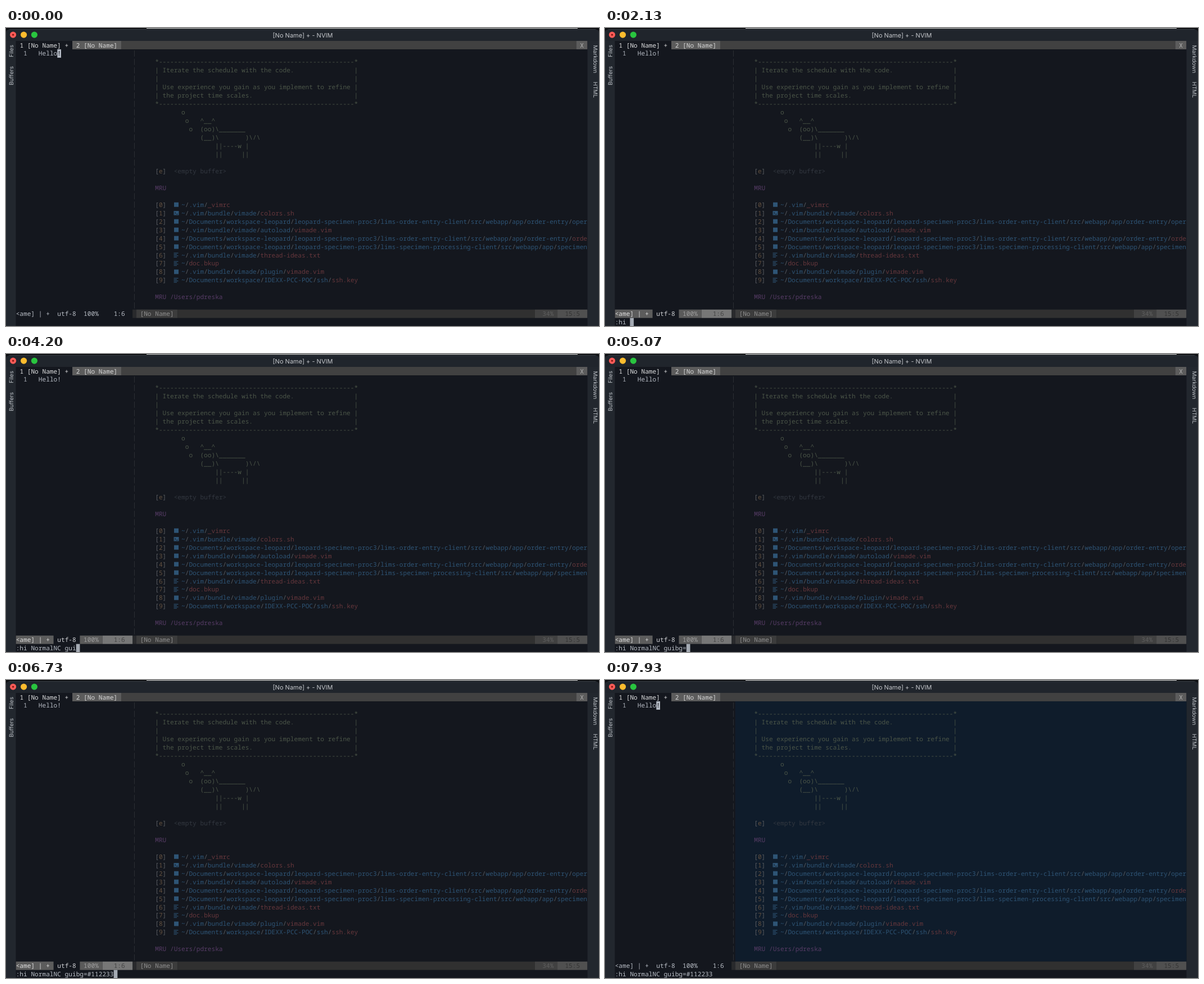
Write an HTML page that moves like this. It is 1055 px wide and 531 px high and loops after 8000 ms.

```html
<!DOCTYPE html>
<html lang="en">
<head>
<meta charset="utf-8">
<title>Editor highlight command</title>
<style>
  html, body { margin: 0; width: 100%; height: 100%; overflow: hidden; background: #0b0d10; }
  svg { display: block; width: 1055px; height: 531px; }
  text { white-space: pre; text-rendering: geometricPrecision; }
  .mono { font: 11.15px "Noto Sans Mono", "DejaVu Sans Mono", monospace; }
  .ui { font: 10px Inter, "Open Sans", sans-serif; fill: #bcc0c6; text-anchor: middle; }
  .title { font-size: 11px; fill: #c3c6ca; }
</style>
</head>
<body>
<svg id="stage" viewBox="0 0 1055 531">
  <defs><clipPath id="grid"><rect x="17" y="22" width="1017.5" height="509"/></clipPath></defs>
  <rect x="250" width="767" height="1" fill="#e4e6e6"/>
  <path d="M0 531V9Q0 2 7 2H1048Q1055 2 1055 9V531Z" fill="#20252c"/>
  <rect x="6" y="2" width="1043" height="1" fill="#3a3f46"/>
  <rect y="23" width="17.5" height="508" fill="#22272e"/>
  <rect x="1034.5" y="23" width="20.5" height="508" fill="#22272e"/>
  <rect x="17.5" y="23" width="1017" height="508" fill="#14171e"/>
  <circle cx="12.6" cy="12.1" r="5.6" fill="#fc5b57"/>
  <circle cx="12.6" cy="12.1" r="1.7" fill="#7e1411"/>
  <circle cx="31.6" cy="12.1" r="5.6" fill="#fdbc2e"/>
  <circle cx="50.4" cy="12.1" r="5.6" fill="#29c53f"/>
  <text class="ui title" x="528" y="17">[No Name] + - NVIM</text>
  <text class="ui" transform="translate(12.5 41) rotate(-90)">Files</text>
  <text class="ui" transform="translate(12.5 85) rotate(-90)">Buffers</text>
  <text class="ui" transform="translate(1044.5 55.5) rotate(90)">Markdown</text>
  <text class="ui" transform="translate(1044.5 110) rotate(90)">HTML</text>
  <rect id="pane" x="231.8" y="38" width="802.7" height="463.7" fill="#0f1c2b"/>
  <g class="mono" clip-path="url(#grid)">
    <g id="base"></g>
    <g id="normal"></g>
    <g id="command"></g>
    <text id="line" x="17.7" y="528.2" fill="#b9bec6"></text>
    <rect id="caret" y="516.7" width="6.7" height="14.3" fill="#a5abb4"/>
  </g>
</svg>
<script>
const CELL = 6.69, ROW = 14.96, LEFT = 17.7, TOP = 23;
const LOOP = 8000;
const dim = {
  fg: '#5a5e63', green: '#4b5548', red: '#66373c', blue: '#2e5475',
  purple: '#573c66', number: '#62503f', comment: '#333840'
};
const $ = id => document.getElementById(id);
const colX = c => LEFT + c * CELL;
const rowY = r => TOP + r * ROW;

function add(parent, tag, attrs, content) {
  const el = document.createElementNS('http://www.w3.org/2000/svg', tag);
  for (const k in attrs) el.setAttribute(k, attrs[k]);
  if (content) el.textContent = content;
  parent.append(el);
  return el;
}
const put = (g, row, col, str, fill, weight = 400) =>
  add(g, 'text', { x: colX(col), y: rowY(row) + 11.5, fill, 'font-weight': weight }, str);
const fillCells = (g, row, from, to, fill) =>
  add(g, 'rect', { x: colX(from), y: rowY(row), width: (to - from) * CELL, height: ROW, fill });

const base = $('base'), normal = $('normal'), command = $('command');

// Tab line
fillCells(base, 0, 15, 28, '#5c5c5c');
fillCells(base, 0, 28, 149, '#414141');
fillCells(base, 0, 149, 152, '#5c5c5c');
put(base, 0, 1, '1 [No Name] +', '#dedfe0', 500);
put(base, 0, 16, '2 [No Name]', '#d6d6d6', 500);
put(base, 0, 150, 'X', '#b5b5b5');

// Left window and split line
put(base, 1, 2, '1', '#a9aeb7');
put(base, 1, 6, 'Hello!', '#b4b9c2');
for (let r = 1; r < 32; r++)
  add(base, 'rect', { x: 228, y: rowY(r) + 2, width: 1, height: 11, fill: '#2b2e33' });

// Start screen header
const rule = '*' + '-'.repeat(52) + '*';
const boxed = s => '| ' + s.padEnd(51) + '|';
[
  rule,
  boxed('Iterate the schedule with the code.'),
  boxed(''),
  boxed('Use experience you gain as you implement to refine'),
  boxed('the project time scales.'),
  rule,
  '       o',
  '        o   ^__^',
  '         o  (oo)\\_______',
  '            (__)\\       )\\/\\',
  '                ||----w |',
  '                ||     ||'
].forEach((s, i) => put(base, 2 + i, 37, s, dim.green));

function key(row, label) {
  put(base, row, 37, '[ ]', dim.fg);
  put(base, row, 38, label, dim.number);
}
key(15, 'e');
put(base, 15, 42, '<empty buffer>', dim.comment);
put(base, 17, 37, 'MRU', dim.purple);
put(base, 30, 37, 'MRU /Users/pdreska', dim.purple);

// Recent files: icon kind, directory, file name
function icon(kind, row) {
  const x = 298.5, y = rowY(row) + 3.5;
  const box = (dx, dy, width, height, fill = dim.blue) =>
    add(base, 'rect', { x: x + dx, y: y + dy, width, height, fill });
  if (kind === 'mark') box(0.5, 0, 8, 8);
  if (kind === 'shell') {
    box(0, 0.3, 9, 7.5);
    add(base, 'path', { d: `M${x + 1.7} ${y + 2.3}l1.8 1.7l-1.8 1.7M${x + 4.5} ${y + 6}h2.6`, fill: 'none', stroke: '#14171e' });
  }
  if (kind === 'text') [8, 5.5, 8, 5.5].forEach((w, i) => box(0, i * 2.4, w, 1.1));
}
const lab = '~/Documents/workspace-leopard/leopard-specimen-proc3/';
const vim = '~/.vim/bundle/vimade/';
[
  ['mark', '~/.vim/', '_vimrc'],
  ['shell', vim, 'colors.sh'],
  ['mark', lab + 'lims-order-entry-client/src/webapp/app/order-entry/oper', ''],
  ['mark', vim + 'autoload/', 'vimade.vim'],
  ['mark', lab + 'lims-order-entry-client/src/webapp/app/order-entry/', 'orde'],
  ['mark', lab + 'lims-specimen-processing-client/src/webapp/app/specimen', ''],
  ['text', vim, 'thread-ideas.txt'],
  ['text', '~/', 'doc.bkup'],
  ['mark', vim + 'plugin/', 'vimade.vim'],
  ['text', '~/Documents/workspace/IDEXX-PCC-POC/ssh/', 'ssh.key']
].forEach(([kind, dir, file], i) => {
  const row = 19 + i;
  key(row, String(i));
  icon(kind, row);
  const path = put(base, row, 44, '', dim.blue);
  for (const part of dir.split(/(\/)/))
    add(path, 'tspan', part === '/' ? { fill: dim.fg } : {}, part);
  add(path, 'tspan', { fill: dim.red }, file);
});

// Status line of the right window
fillCells(base, 32, 31, 32, '#292a2c');
fillCells(base, 32, 32, 43, '#3c3c3c');
fillCells(base, 32, 43, 138, '#303030');
fillCells(base, 32, 138, 144, '#414141');
fillCells(base, 32, 144, 152, '#505050');
put(base, 32, 33, '[No Name]', '#8d8d8d');
put(base, 32, 140, '34%', '#5f5f5f');
put(base, 32, 146, '15:5', '#343434');

// Left status line and cursor, per mode
function status(g, name, enc, percent, place, weight) {
  put(g, 32, 0, '<ame] | +', name, weight);
  put(g, 32, 11, 'utf-8', enc);
  put(g, 32, 18, '100%', percent);
  put(g, 32, 26, '1:6', place);
}
status(normal, '#b9bec6', '#b9bec6', '#b9bec6', '#b9bec6');
fillCells(normal, 1, 11, 12, '#b4bac4');
put(normal, 1, 11, '!', '#14171e');

fillCells(command, 32, 0, 10, '#5c5c5c');
fillCells(command, 32, 17, 23, '#5a5a5a');
fillCells(command, 32, 23, 31, '#777777');
status(command, '#dedede', '#d0d2d5', '#a0a0a0', '#454545', 500);

// Typing: one time per character, then Enter
const typed = ':hi NormalNC guibg=#112233';
const strokes = [
  600, 1600, 1870, 2070, 2330, 2470, 2600, 2670, 2800, 2870,
  3200, 3400, 3600, 3800, 3930, 4130, 4470, 4670, 5000, 5470,
  5730, 5870, 6130, 6330, 6530, 6730
];
const enter = 7060;
const pane = $('pane'), caret = $('caret'), line = $('line');
const show = (el, on) => el.setAttribute('visibility', on ? 'visible' : 'hidden');

function draw() {
  const t = performance.now() % LOOP;
  const count = strokes.filter(s => s <= t).length;
  const done = t >= enter, typing = count > 0 && !done;
  show(pane, done);
  show(normal, !typing);
  show(command, typing);
  show(caret, typing);
  line.textContent = typed.slice(0, count);
  caret.setAttribute('x', colX(count));
  requestAnimationFrame(draw);
}
draw();
</script>
</body>
</html>
```
